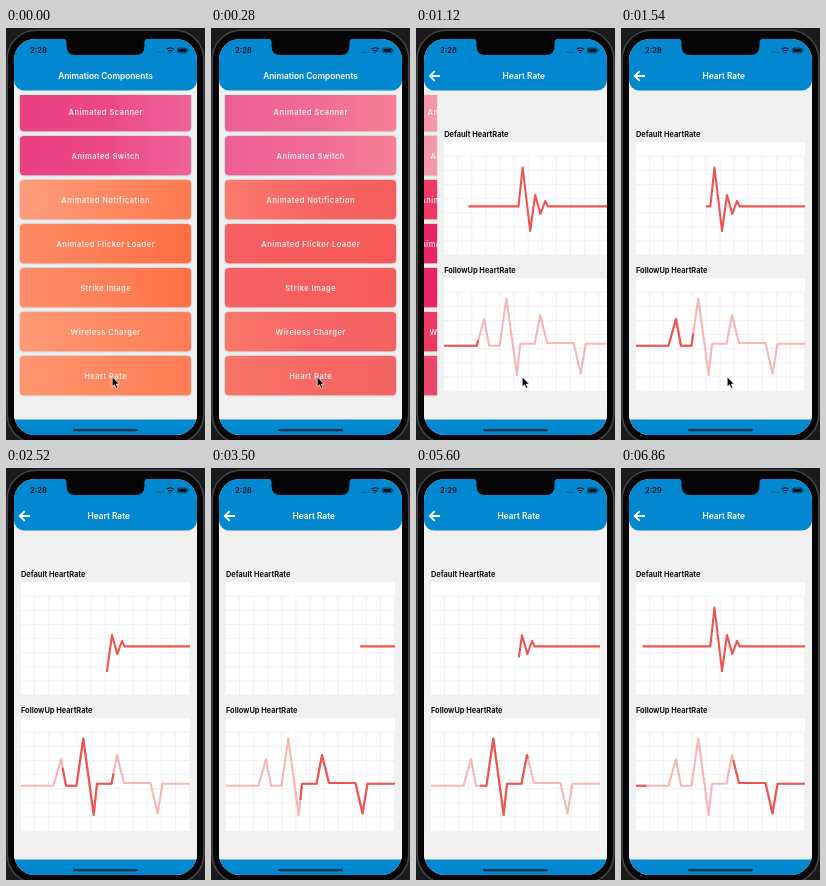
Write an HTML page that moves like this. It is 199 px wide and 412 px high and loops after 7000 ms.

```html
<!DOCTYPE html>
<html lang="en">
<head>
<meta charset="utf-8">
<title>Animation Components</title>
<style>
  html, body { margin: 0; width: 100%; height: 100%; overflow: hidden; background: #1b1b1d; }
  svg { display: block; width: 100%; height: 100%; }
  text { font-family: Inter, "Open Sans", sans-serif; font-weight: 600; }
  .title { font-size: 8.35px; fill: #fff; text-anchor: middle; }
  .label { font-size: 7.5px; letter-spacing: .47px; fill: #fff; fill-opacity: .86; text-anchor: middle; }
  .head { font-size: 7.4px; font-weight: 700; fill: #111; }
  .card { filter: drop-shadow(0 .9px 1.1px rgba(0, 0, 0, .3)); }
  .trace { fill: none; stroke: #ef5350; stroke-width: 2.1; stroke-linejoin: round; }
  .grid { fill: none; stroke: #ececf7; stroke-width: .8; }
</style>
</head>
<body>
<svg viewBox="0 0 199 412" preserveAspectRatio="none">
  <defs id="defs">
    <clipPath id="screen"><rect x="8" y="11" width="183" height="396" rx="21"/></clipPath>
    <clipPath id="list"><rect x="8" y="67" width="183" height="324"/></clipPath>
  </defs>
  <rect width="199" height="412" fill="#1b1b1d"/>
  <rect x="1.2" y="2.2" width="196.6" height="413" rx="29" fill="#050505" stroke="#454548" stroke-width="1.6"/>
  <g clip-path="url(#screen)">
    <rect x="8" y="11" width="183" height="396" fill="#f1f1f1"/>
    <g id="home">
      <rect x="8" y="40" width="183" height="352" fill="#f1f1f1"/>
      <g id="rows" clip-path="url(#list)"></g>
    </g>
    <g id="detail">
      <rect x="8" y="40" width="183" height="352" fill="#f1f1f1"/>
      <text class="head" x="15" y="108.6">Default HeartRate</text>
      <text class="head" x="15" y="244.6">FollowUp HeartRate</text>
      <rect x="15" y="114" width="169" height="113" fill="#fff"/>
      <rect x="15" y="250" width="169" height="113" fill="#fff"/>
      <path class="grid" id="grid"/>
      <path class="trace" id="pulse"/>
      <g transform="translate(0 .5)">
        <path class="trace" id="ghost" stroke-opacity=".42"/>
        <path class="trace" id="runA"/>
        <path class="trace" id="runB"/>
      </g>
    </g>
    <path d="M8 11H191V52.4a10 10 0 0 1-10 10H18a10 10 0 0 1-10-10Z" fill="#0288d1"/>
    <rect x="8" y="391.5" width="183" height="16" fill="#0288d1"/>
    <text class="title" id="homeTitle" x="99.5" y="51">Animation Components</text>
    <text class="title" id="pageTitle" x="102.7" y="51">Heart Rate</text>
    <path id="back" d="M24 48H14M18.7 43.2L13.8 48L18.7 52.8" fill="none" stroke="#fff" stroke-width="1.8"/>
    <text id="clock" x="24" y="25.4" font-size="7.6" fill="#06151f"></text>
    <path d="M150 24.2h1.3m1 0h1.3m1 0h1.3m1 0h1.3" stroke="#08405f" stroke-width="1"/>
    <g fill="none" stroke="#08141e" stroke-width="1.2">
      <path d="M160.6 21.4a5.2 5.2 0 0 1 7.2 0M162.2 23.2a3 3 0 0 1 4 0"/>
      <rect x="171.5" y="20" width="9.6" height="4.8" rx="1.4" stroke-width=".6"/>
    </g>
    <path d="M163.2 24.2h2l-1 1.2ZM172.3 20.8h8v3.2h-8ZM181.7 21.6h.8v1.6h-.8Z" fill="#08141e"/>
    <rect x="67" y="401" width="65" height="2.2" rx="1.1" fill="#0f3149"/>
  </g>
  <path d="M56 10.5q4.5 0 4.5 4v3.5q0 9 9 9h60q9 0 9-9v-3.5q0-4 4.5-4Z" fill="#050505"/>
  <g id="ring" fill="none">
    <circle cx="106.5" cy="350.2" r="14.2" stroke="#fff" stroke-opacity=".6" stroke-width="2"/>
    <circle cx="106.5" cy="350.2" r="14.2" stroke="#222"/>
  </g>
  <path id="cursor" d="M106.2 348.7v10l2.3-2 1.6 3.7 1.7-.8-1.6-3.5h3Z" fill="#000" stroke="#fff" stroke-width=".7"/>
</svg>
<script>
const NS = "http://www.w3.org/2000/svg";
const LOOP = 7000, PUSH = 880;
const BEAT_AT = 900, BEAT = 2950, SWEEP = 2920; // each sweep rests briefly before the next
const $ = id => document.getElementById(id);
const clamp = v => Math.max(0, Math.min(1, v));

function add(parent, tag, attrs, text) {
  const el = document.createElementNS(NS, tag);
  for (const k in attrs) el.setAttribute(k, attrs[k]);
  if (text) el.textContent = text;
  return parent.appendChild(el);
}

const rgb = hex => [1, 3, 5].map(i => parseInt(hex.slice(i, i + 2), 16));
const mix = (a, b, u) => {
  const to = rgb(b);
  return `rgb(${rgb(a).map((v, i) => Math.round(v + (to[i] - v) * u))})`;
};

// Each row: label, gradient stops at rest, gradient stops after the fade
const pink = ["#ea3f80", "#ec4886", "#ef6398"], pale = ["#f48fb1", "#f59bae", "#ffab91"];
const red = ["#f54757", "#ea2f68", "#e93670"], rose = ["#e91e63", "#e92865", "#eb3d78"];
const rows = [
  ["Animated Scanner", pink, pale],
  ["Animated Switch", pink, pale],
  ["Animated Notification", ["#ff9c7e", "#ff8a63", "#ff794f"], red],
  ["Animated Flicker Loader", ["#ff8a62", "#ff7c54", "#ff6d43"], rose],
  ["Strike Image", ["#ff8e68", "#ff8059", "#ff7047"], rose],
  ["Wireless Charger", ["#ff9976", "#ff8a64", "#ff7e58"], red],
  ["Heart Rate", ["#ff9670", "#ff8860", "#ff7d56"], ["#ee4360", "#e83b69", "#e33c76"]]
].map(([name, from, to], i) => {
  const y = 64 + 44 * i;
  const grad = add($("defs"), "linearGradient", { id: "grad" + i });
  const stops = from.map((c, k) => add(grad, "stop", { offset: k / 2 }));
  const face = add($("rows"), "g", { class: "card" });
  add(face, "rect", { x: 14, y, width: 171, height: 39.3, rx: 4, fill: `url(#grad${i})` });
  add(face, "text", { class: "label", x: 99.7, y: y + 22.6 }, name);
  return { from, to, stops, face };
});

let grid = "";
for (const top of [114, 250]) {
  for (let x = 28.5; x < 184; x += 14.1) grid += `M${x} ${top + 14}V${top + 113}`;
  for (let y = top + 14.3; y < top + 113; y += 14.1) grid += `M15 ${y}H184`;
}
$("grid").setAttribute("d", grid);

$("pulse").setAttribute("d", "M15 178.4H89.3L93.5 139.5L101 203L106 167L111.3 186L116 173L118.5 178.4H184");
const wave = "M15 317.2H47.5L55 290.5L60 317.2H70.5L77.3 270L87.7 346.5L91 315.3H105.5L111 286.5L118 314.5H144.5L151.5 345L156.5 315.3H184";
for (const id of ["ghost", "runA", "runB"]) $(id).setAttribute("d", wave);

const pulseLen = $("pulse").getTotalLength(), waveLen = $("ghost").getTotalLength();
const CYCLE = waveLen * 1.137, RUN = waveLen * .475;

function showPart(id, from, to, len) {
  const a = Math.max(0, from), b = Math.min(len, to), el = $(id);
  el.style.display = b > a ? "" : "none";
  el.setAttribute("stroke-dasharray", `0 ${a} ${Math.max(0, b - a)} ${len * 2}`);
}

const show = (id, on) => { $(id).style.display = on ? "" : "none"; };

function draw(t) {
  const fade = clamp(t / 700);
  for (const r of rows) r.stops.forEach((s, k) => s.setAttribute("stop-color", mix(r.from[k], r.to[k], fade)));
  rows[6].face.setAttribute("opacity", 1 - .05 * clamp((t - 560) / 140));

  const push = 1 - (1 - clamp((t - PUSH) / 500)) ** 4;
  $("home").setAttribute("transform", `translate(${-55 * push})`);
  $("detail").setAttribute("transform", `translate(${183 * (1 - push)})`);
  show("home", push < 1);
  show("detail", push > 0);
  $("homeTitle").setAttribute("opacity", clamp(1 - push * 1.5));
  $("homeTitle").setAttribute("transform", `translate(${-50 * push})`);
  $("pageTitle").setAttribute("opacity", push);
  $("pageTitle").setAttribute("transform", `translate(${70 * (1 - push)})`);
  $("back").setAttribute("opacity", push);

  const since = Math.max(0, t - BEAT_AT), p = clamp(since % BEAT / SWEEP);
  showPart("pulse", p * pulseLen, pulseLen, pulseLen);
  const head = p * CYCLE, last = since >= BEAT ? head + CYCLE : 0;
  showPart("runA", head - RUN, head, waveLen);
  showPart("runB", last - RUN, last, waveLen);

  $("clock").textContent = t < 4060 ? "2:28" : "2:29";
  show("ring", t >= 600 && t < 840);
  show("cursor", t < 2240);
}

const start = performance.now();
function tick() {
  draw((performance.now() - start) % LOOP);
  requestAnimationFrame(tick);
}
tick();
</script>
</body>
</html>
```
